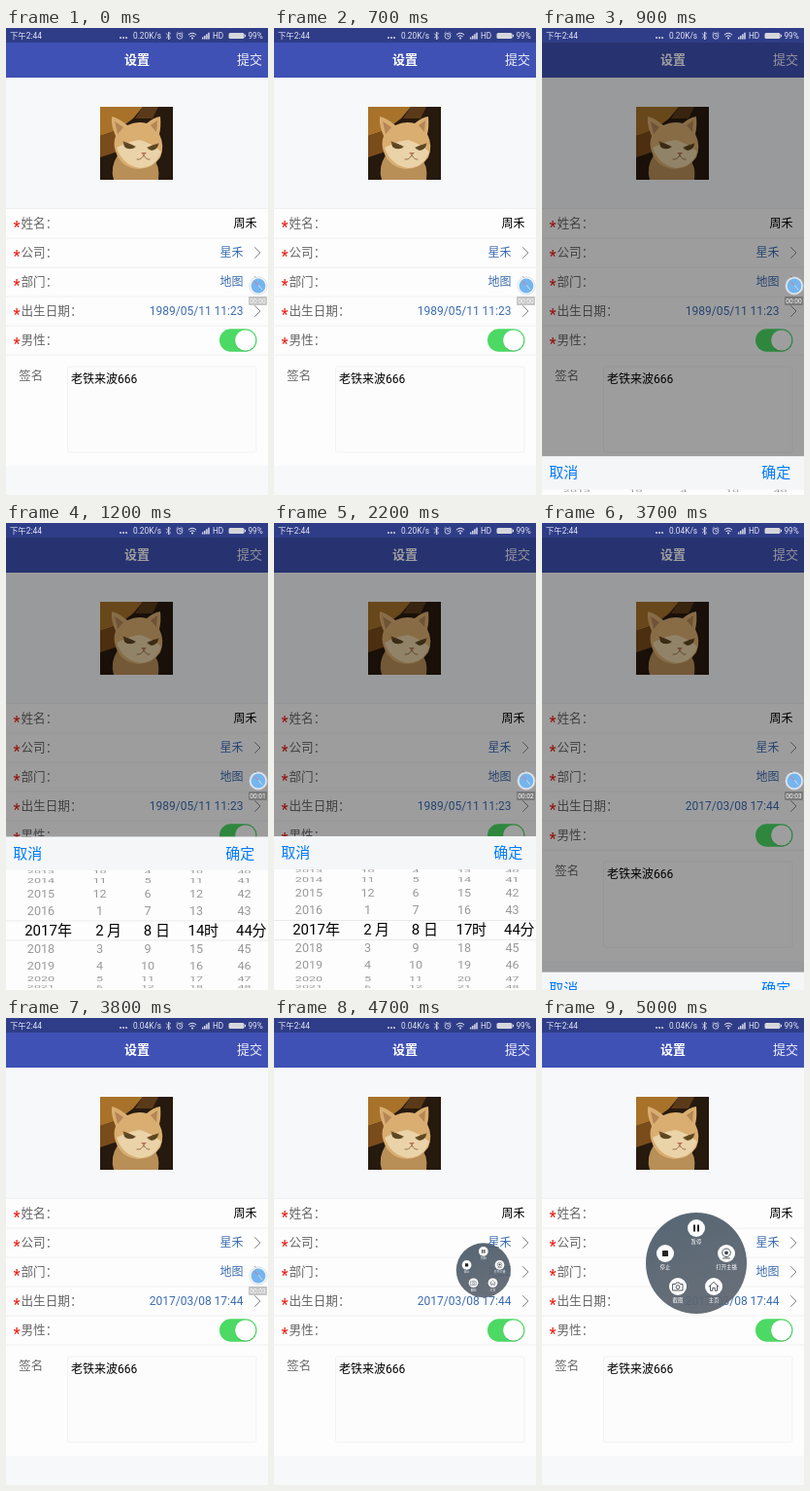
An HTML page for the animation above (5100 ms loop, 270 by 480 pixels).

```html
<!DOCTYPE html>
<html lang="zh-CN">
<head>
<meta charset="utf-8">
<style>
html, body { margin: 0; height: 100%; overflow: hidden; background: #f8f8f9; }
svg { display: block; width: 100vw; height: 100vh; font-family: Roboto, "Noto Sans CJK SC", "Noto Sans CJK", sans-serif; }
text { white-space: pre; }
</style>
</head>
<body>
<svg id="stage" viewBox="0 0 270 480"></svg>
<script>
const LOOP = 5100, STEP = 100;
const BLUE = '#3c6cb0', IOS = '#007aff';
const $ = id => document.getElementById(id);

// Text placed by its vertical centre
const text = (x, cy, s, size, fill, anchor = 'start', more = '') =>
  `<text x="${x}" y="${cy + size * 0.37}" font-size="${size}" fill="${fill}" text-anchor="${anchor}" ${more}>${s}</text>`;
const rect = (x, y, w, h, fill, more = '') =>
  `<rect x="${x}" y="${y}" width="${w}" height="${h}" fill="${fill}" ${more}/>`;
const circle = (x, y, r, fill, more = '') =>
  `<circle cx="${x}" cy="${y}" r="${r}" fill="${fill}" ${more}/>`;
const path = (d, fill, more = '') => `<path d="${d}" fill="${fill}" ${more}/>`;
const line = (d, stroke, width = 1) =>
  path(d, 'none', `stroke="${stroke}" stroke-width="${width}" stroke-linecap="round" stroke-linejoin="round"`);

function statusBar() {
  const w = '#e4e6f2';
  return rect(0, 0, 270, 15, '#2f3d88')
    + text(4, 8, '下午2:44', 8.4, w)
    + [118, 121, 124].map(x => circle(x, 10, 0.9, w)).join('')
    + text(131, 8, '', 8.3, w, 'start', 'id="speed"')
    + line('M165.3 5.8 169.5 10 167.5 12V4L169.5 6 165.3 10.2', w, 0.8)
    + circle(179, 8.3, 2.9, 'none', `stroke="${w}" stroke-width=".8"`)
    + line('M179 6.7V8.5H180.3M175.8 5.6 177.2 4.4M182.2 5.6 180.8 4.4', w, 0.7)
    + line('M188.2 6.8Q192 3.4 195.8 6.8M189.7 8.5Q192 6.5 194.3 8.5', w, 1)
    + circle(192, 10.5, 1, w)
    + [0, 1, 2, 3].map(i => rect(202 + i * 2.1, 9.5 - i * 1.6, 1.4, 2 + i * 1.6, w)).join('')
    + text(213, 8, 'HD', 8.2, w)
    + rect(229.5, 5, 16, 6, '#d6d7dc', 'rx="1.6"') + rect(246, 6.8, 1, 2.4, w)
    + text(249.5, 8, '99%', 8.2, w);
}

function photo() {
  return `<svg x="97" y="81" width="75" height="75" viewBox="0 0 75 75">`
    + rect(0, 0, 75, 75, '#26190e')
    + path('M0 0H44L34 12 18 24 0 30Z', '#a8722a')
    + path('M0 30 18 24 18 46 0 52Z', '#7a4c1c')
    + path('M44 0H60L54 12 36 12Z', '#5a3a18')
    + path('M18 50Q10 62 14 75H60Q62 60 54 52Z', '#b98f58')
    + path('M12 10Q20 12 28 19Q38 14 48 17Q55 11 62 10Q63 21 61 28Q67 40 62 52Q54 64 39 64Q21 62 16 46Q13 38 16 30Q11 19 12 10Z', '#d9ae70')
    + path('M15 15 24 21 18 28ZM59 14 52 19 58 26Z', '#b58556')
    + path('M17 42Q28 36 41 34Q54 38 63 46Q58 62 41 63Q23 60 17 42Z', '#ead3a8')
    + path('M24 37Q32 37 36 42Q29 45 25 41ZM49 43Q54 38 60 39Q59 44 53 45Z', '#5b4722')
    + line('M24 36 36 41M49 42 60 38', '#6b4a26', 1.2)
    + path('M42 47H48L45 50Z', '#b5745c')
    + line('M45 50Q42 55 38 54M45 50Q48 55 51 54', '#80573a', 0.8)
    + '</svg>';
}

function row(i, label, value, arrow, id = '') {
  const y = 201 + i * 30;
  return text(7.5, y + 2.8, '*', 16, '#e8261c', 'start', 'font-weight="500"')
    + text(15.5, y - 0.4, label + '：', 12.6, '#666')
    + text(arrow ? 244.5 : 258.5, y, value, 12, arrow ? BLUE : '#000', 'end', id && `id="${id}"`)
    + (arrow ? line(`M256.5 ${y - 5.5}l5.5 5.5-5.5 5.5`, '#888', 1) : '')
    + rect(0, y + 14.7, 270, 0.7, '#ececec');
}

function page() {
  return rect(0, 0, 270, 480, '#f7f8f9')
    + rect(0, 15, 270, 36, '#3f51b5')
    + text(135, 32.6, '设置', 13, '#fff', 'middle', 'font-weight="700"')
    + text(264, 32.6, '提交', 13, '#f0f1fa', 'end')
    + photo()
    + rect(0, 185.5, 270, 264.5, '#fdfdfe') + rect(0, 185, 270, 0.7, '#ececec')
    + row(0, '姓名', '周禾', false)
    + row(1, '公司', '星禾', true)
    + row(2, '部门', '地图', true)
    + row(3, '出生日期', '', true, 'date')
    + row(4, '男性', '', false)
    + rect(220, 309.3, 38.5, 23.4, '#4cd964', 'rx="11.7"')
    + circle(246.8, 321.6, 10.8, '#000', 'opacity=".12"') + circle(246.8, 321, 10.6, '#fff')
    + text(13.3, 357.4, '签名', 12.4, '#666')
    + rect(63.5, 348, 194.5, 88, '#fcfcfd', 'rx="2" stroke="#efefef" stroke-width=".8"')
    + text(67, 360.6, '老铁来波666', 12, '#000');
}

function panel() {
  return rect(0, 0, 270, 158, '#fdfdfe') + rect(0, 0, 270, 34, '#f5f6f7')
    + text(7.3, 16.4, '取消', 15, IOS) + text(256.2, 16.4, '确定', 15, IOS, 'end')
    + rect(0, 86, 270, 0.6, '#ddd') + rect(0, 106, 270, 0.6, '#ddd')
    + '<svg y="34" width="270" height="124" viewBox="0 -61.5 270 124"><g id="wheels"></g></svg>';
}

// Number column on a turning drum; low..high wraps round
function wheel(x, unitX, unit, value, low, high) {
  const near = Math.round(value), span = high - low + 1;
  let out = '';
  for (let n = near - 4; n <= near + 4; n++) {
    const a = (n - value) * 0.32, c = Math.cos(a), on = n === near;
    const label = low + ((n - low) % span + span) % span;
    out += `<g transform="translate(${x} ${62 * Math.sin(a) - 0.7}) scale(1 ${c})">`
      + text(0, 0.5, label, on ? 15 : 12.6, on ? '#000' : '#999', 'middle')
      + (on ? text(unitX - x, 0.5, unit, 15, '#000') : '') + '</g>';
  }
  return out;
}

function ball() {
  return circle(260, 265, 9.2, '#f2f5f9', 'stroke="#c3cbd4" stroke-width=".6" opacity=".85"')
    + circle(260, 265, 7.4, '#74b5ee')
    + line('M256 260.5 260.5 264.5', '#d9788a', 1)
    + line('M260.5 264.5 263.5 268.5', '#d8ecfb', 0.8)
    + rect(250, 276, 19, 9, '#000', 'opacity=".22" rx="1"')
    + text(259.5, 280.5, '', 6.6, '#fff', 'middle', 'id="clock"');
}

function menu() {
  const ink = '#3e4852';
  const item = (x, y, label, icon) =>
    `<g transform="translate(${x} ${y})">` + circle(0, 0, 9, '#fff') + icon
    + text(0, 13.8, label, 5.4, '#fff', 'middle') + '</g>';
  return circle(0, 0, 52, 'url(#slate)', 'opacity=".93"')
    + item(0, -36, '暂停', rect(-3, -3.5, 2, 7, '#222') + rect(1, -3.5, 2, 7, '#222'))
    + item(-32, -10, '停止', rect(-3, -3, 6, 6, '#222', 'rx=".6"'))
    + item(31, -10, '打开主播', circle(0, -0.7, 4.3, 'none', `stroke="${ink}" stroke-width=".9"`)
      + circle(0, -0.7, 1.9, ink) + line('M-3.5 5H3.5', ink, 0.9))
    + item(-19, 24, '截图', line('M-5-2.5H-2.4L-1.5-4H1.5L2.4-2.5H5V4H-5Z', ink, 0.9)
      + circle(0, 0.6, 1.9, 'none', `stroke="${ink}" stroke-width=".9"`))
    + item(18, 24, '主页', line('M-5 .2 0-4.6 5 .2M-3.5-.8V4.3H-1.2V1.3H1.2V4.3H3.5V-.8', ink, 0.9));
}

$('stage').innerHTML =
  `<defs><linearGradient id="slate" x2=".4" y2="1"><stop stop-color="#495b69"/><stop offset="1" stop-color="#5c646f"/></linearGradient></defs>`
  + page()
  + `<g id="modal">${rect(0, 15, 270, 465, '#000', 'opacity=".38"')}<g id="panel">${panel()}</g></g>`
  + statusBar()
  + `<g id="ball">${ball()}</g><g id="menu">${menu()}</g>`;

const part = (t, start, length) => Math.min(1, Math.max(0, (t - start) / length));
const inOut = p => p < 0.5 ? 2 * p * p : 1 - 2 * (1 - p) ** 2;
const out = p => 1 - (1 - p) ** 2;
const show = (id, on) => $(id).setAttribute('display', on ? 'inline' : 'none');
const move = (id, value) => $(id).setAttribute('transform', value);

function draw(t) {
  $('speed').textContent = t < 2900 ? '0.20K/s' : '0.04K/s';
  $('date').textContent = t < 3300 ? '1989/05/11 11:23' : '2017/03/08 17:44';
  $('clock').textContent = '00:0' + Math.floor(t / 1000);

  const open = t >= 900 && t < 3800;
  show('modal', open);
  if (open) {
    const up = inOut(part(t, 723, 500)) - inOut(part(t, 3320, 500));
    move('panel', `translate(0 ${480 - 158 * up})`);
    const month = 2 + inOut(part(t, 2200, 600));
    const hour = 14 + 3 * out(part(t, 1600, 600));
    $('wheels').innerHTML = wheel(36, 53, '年', 2017, 1900, 2100)
      + wheel(96.5, 104, '月', month, 1, 12)
      + wheel(146, 154, '日', 8, 1, 31)
      + wheel(196, 204, '时', hour, 0, 23)
      + wheel(245.5, 253.5, '分', 44, 0, 59);
  }

  const grow = out(part(t, 4600, 400));
  show('ball', !grow);
  show('menu', grow);
  move('menu', `translate(${260 - 101 * grow} ${265 - 13 * grow}) scale(${0.18 + 0.82 * grow})`);
}

let last = -1;
function tick() {
  const t = Math.floor(performance.now() % LOOP / STEP) * STEP;
  if (t !== last) draw(last = t);
  requestAnimationFrame(tick);
}
tick();
</script>
</body>
</html>
```
